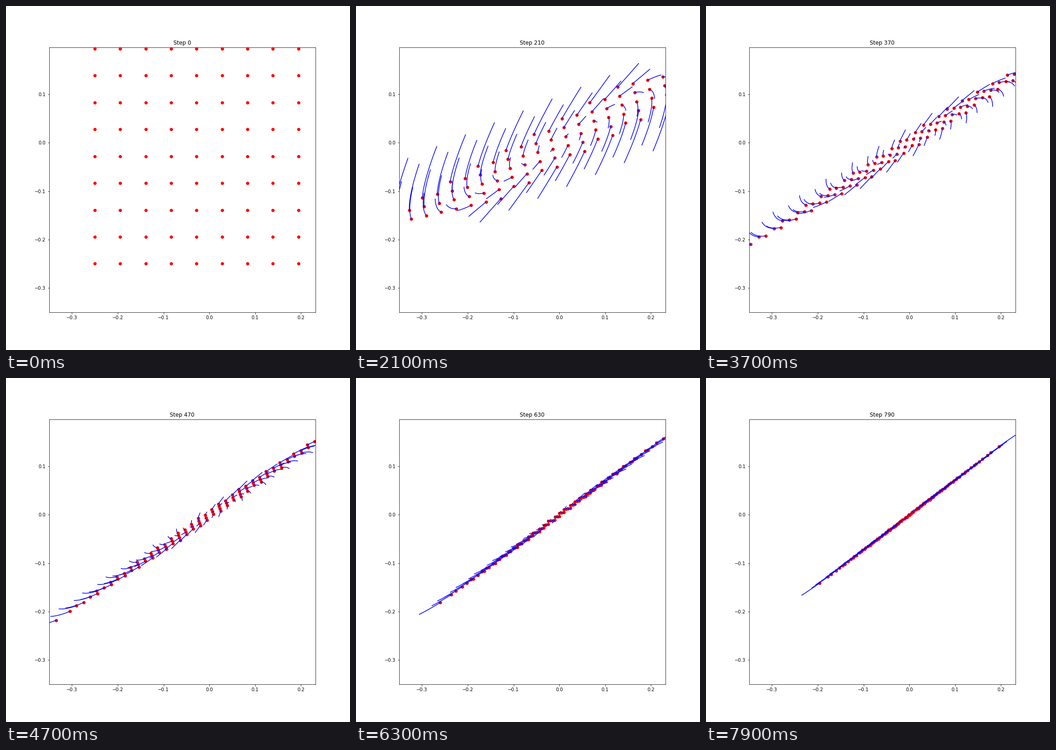
Animation of 748 by 748 pixels, one loop 8000 ms. Source, as a matplotlib script:

```python
import numpy as np
import matplotlib.pyplot as plt
from matplotlib.animation import FuncAnimation

SIZE, DPI = 748, 72
FRAMES, INTERVAL = 80, 100
STEPS_PER_FRAME, TRAIL = 10, 100

# Explicit Euler steps of the linear flow z' = A z
A = np.array([[0.25, -0.6], [0.6, -1.0]])
STEP_SIZE = 0.01


def simulate(steps):
    """Return positions with shape (steps, 2, points)."""
    side = np.linspace(-0.25, 0.25, 10)
    path = [np.array([g.ravel() for g in np.meshgrid(side, side)])]
    for _ in range(steps - 1):
        path.append(path[-1] + STEP_SIZE * A @ path[-1])
    return np.array(path)


path = simulate(FRAMES * STEPS_PER_FRAME)

fig, ax = plt.subplots(figsize=(SIZE / DPI, SIZE / DPI), dpi=DPI)
ax.set_xlim(-0.35, 0.232)
ax.set_ylim(-0.35, 0.1973)
ax.set_xticks(np.arange(-3, 3) / 10)
ax.set_yticks(np.arange(-3, 2) / 10)
title = ax.set_title("Step 0")
dots = ax.scatter(*path[0], color="red")
trails = ax.plot(path[:1, 0], path[:1, 1], color="blue", lw=1.5)


def update(frame):
    step = frame * STEPS_PER_FRAME
    recent = path[max(0, step - TRAIL):step + 1]
    for i, trail in enumerate(trails):
        trail.set_data(recent[:, 0, i], recent[:, 1, i])
    dots.set_offsets(path[step].T)
    title.set_text(f"Step {step}")
    return [dots, title, *trails]


anim = FuncAnimation(fig, update, frames=FRAMES, interval=INTERVAL,
                     repeat=True, repeat_delay=0, blit=False)
plt.show()
```
